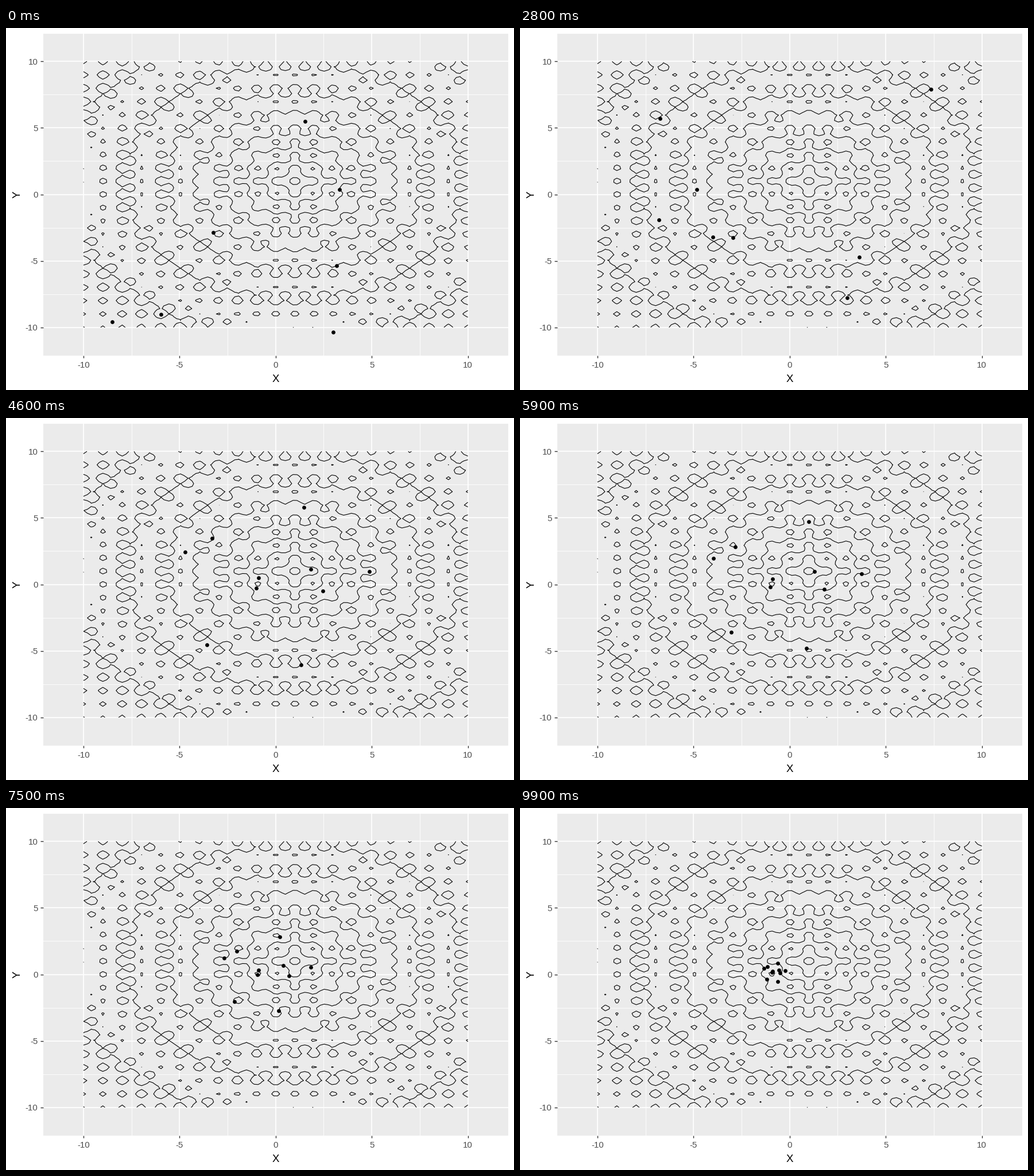
A matplotlib script for the animation above (10000 ms loop, 885 by 632 pixels).

```python
import numpy as np
import matplotlib
import matplotlib.pyplot as plt
from matplotlib.animation import FuncAnimation

W, H, DPI = 885, 632, 100
LEFT, RIGHT, TOP, BOTTOM = 64.5, 875, 9.5, 571.5
LIM = 12.1
STEPS = 11          # frames from one swarm state to the next
FRAMES = 100

matplotlib.rcParams["path.simplify"] = False
matplotlib.rcParams["font.family"] = "Liberation Sans"


def pt(px):
    return px * 72 / DPI


def ackley(x, y):
    """Ackley test function with its minimum at (1, 1)."""
    u, v = x - 1, y - 1
    bowl = 20 - 20 * np.exp(-0.2 * np.sqrt((u * u + v * v) / 2))
    waves = np.exp((np.cos(2 * np.pi * u) + np.cos(2 * np.pi * v)) / 2)
    return bowl + np.e - waves


def to_px(x, y):
    return (LEFT + (x + LIM) / (2 * LIM) * (RIGHT - LEFT),
            BOTTOM - (y + LIM) / (2 * LIM) * (BOTTOM - TOP))


# Key points per particle: start, roam, scout, hunt (OUT is off the plot)
OUT = (np.nan, np.nan)
GOAL = np.array([440, 286])
keys = np.array([
    [(570, 531), (376, 545), (580, 478), (506, 415)],
    [(521, 163), (560, 208), (754, 98), (510, 170)],
    [(581, 282), (817, 150), OUT, (612, 270)],
    [OUT, OUT, (231, 143), (326, 240)],
    [(270, 500), (336, 475), (376, 360), (360, 384)],
    [(185, 513), (107, 191), (220, 360), (368, 218)],
    [(361, 357), (352, 168), (282, 283), (440, 280)],
    [(576, 415), (690, 64), OUT, (521, 266)],
    [OUT, OUT, (317, 378), (436, 296)],
    [OUT, OUT, (598, 419), (540, 300)],
])


def swarm_states():
    """Roam freely, then contract around the goal."""
    start, roam, scout, hunt = keys.swapaxes(0, 1)
    spread = hunt - GOAL
    near = GOAL + 1.15 * spread
    turn = np.where(np.isnan(scout), near, 0.7 * scout + 0.3 * near)
    u = np.linspace(0, 1, 5)
    shrink = 0.13 + 0.87 * (1 - u) ** 1.3
    return [start, roam, scout, turn, near] + [GOAL + k * spread
                                               for k in shrink]


states = swarm_states()


def swarm(frame):
    s, q = divmod(frame, STEPS)
    if q == 0:
        return states[s]
    return states[s] + (states[s + 1] - states[s]) * q / STEPS


fig = plt.figure(figsize=(W / DPI, H / DPI), dpi=DPI, facecolor="white")

# Panel with grid and contours
panel = fig.add_axes([LEFT / W, 1 - BOTTOM / H,
                      (RIGHT - LEFT) / W, (BOTTOM - TOP) / H])
panel.set(xlim=(-LIM, LIM), ylim=(-LIM, LIM), xticks=[], yticks=[],
          facecolor="#EBEBEB")
panel.spines[:].set_visible(False)

majors = range(-10, 11, 5)
for values, width in ((np.arange(-7.5, 8, 5), 0.9), (majors, 1.78)):
    for v in values:
        panel.axvline(v, color="white", lw=pt(width), zorder=0.5)
        panel.axhline(v, color="white", lw=pt(width), zorder=0.5)

axis = np.linspace(-10, 10, 100)
gx, gy = np.meshgrid(axis, axis)
panel.contour(gx, gy, ackley(gx, gy), levels=np.arange(2, 21, 2),
              colors="black", linewidths=pt(1.1), antialiased=True)

# Overlay in pixels: ticks, labels and particles
stage = fig.add_axes([0, 0, 1, 1], facecolor="none")
stage.set(xlim=(0, W), ylim=(H, 0))
stage.axis("off")

tick = dict(color="#333333", lw=pt(1.4), solid_capstyle="butt")
label = dict(color="#4D4D4D", fontsize=pt(15), va="baseline")
title = dict(color="black", fontsize=pt(18.6), ha="center", va="baseline")
for v in majors:
    px, py = to_px(v, v)
    stage.plot([px, px], [BOTTOM, BOTTOM + 4.6], **tick)
    stage.plot([LEFT - 4.6, LEFT], [py, py], **tick)
    stage.text(px, 593, str(v), ha="center", **label)
    stage.text(55.5, py + 5.3, str(v), ha="right", **label)

cx, cy = to_px(0, 0)
stage.text(cx, 618.5, "X", **title)
stage.text(24.5, cy, "Y", rotation=90, rotation_mode="anchor", **title)

dots = stage.scatter([], [], s=pt(6.8) ** 2, color="black", linewidths=0,
                     zorder=5)


def update(frame):
    pos = swarm(frame)
    dots.set_offsets(pos[~np.isnan(pos[:, 0])])
    return (dots,)


anim = FuncAnimation(fig, update, frames=FRAMES, interval=100, repeat=True,
                     repeat_delay=0, init_func=lambda: update(0))
plt.show()
```
